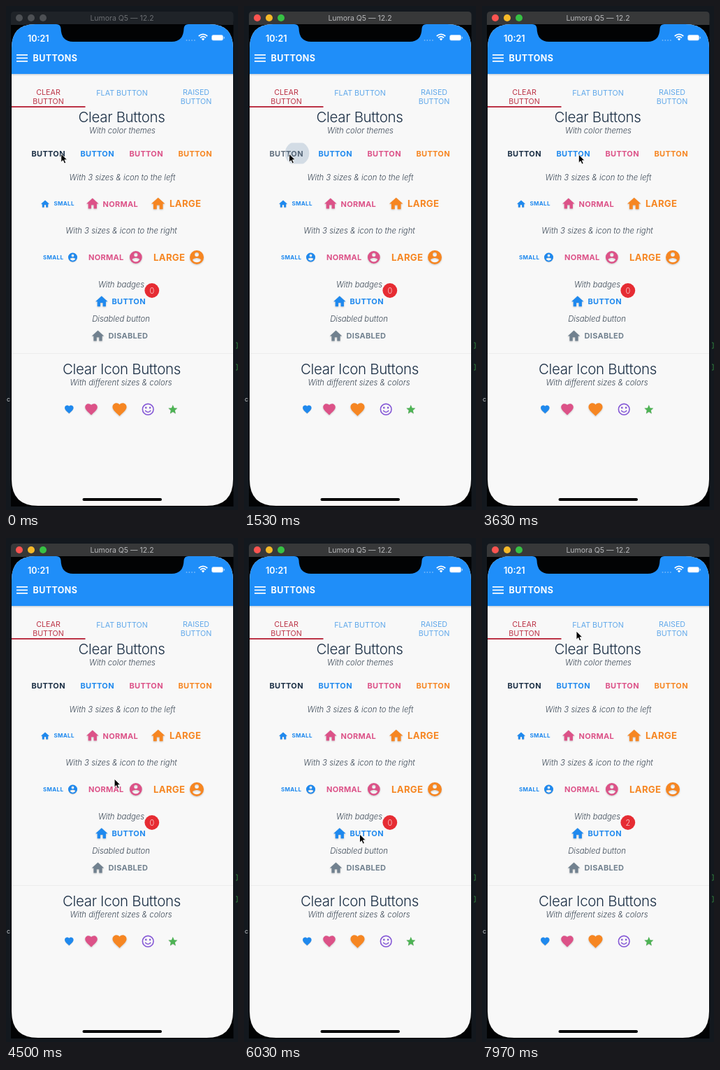
Recreate the animation shown at these times as an HTML page. Size 332 by 720 pixels, loop 8000 ms.

```html
<!DOCTYPE html>
<html lang="en">
<head>
<meta charset="utf-8">
<title>Buttons</title>
<style>
  html, body { margin: 0; width: 100%; height: 100%; overflow: hidden; background: #13181e; }
  svg { display: block; width: 100vw; height: 100vh; }
  text { font-family: Inter, Roboto, sans-serif; white-space: pre; }
  .icon { filter: drop-shadow(0 1px 1px rgba(0, 0, 0, .2)); }
</style>
</head>
<body>
<svg id="stage" viewBox="0 0 332 720"></svg>
<script>
const NS = 'http://www.w3.org/2000/svg';
const stage = document.getElementById('stage');
const LOOP = 8000;

const DARK = '#1b2f45', BLUE = '#1f89ee', PINK = '#dc5288', ORANGE = '#f68622', GREY = '#71818f';
const PAGE = '#f8f8f8', BAR = '#1f8ef9', BLACK = '#020304';

const ICONS = {
  home: 'M10 20v-6h4v6h5v-8h3L12 3 2 12h3v8z',
  user: 'M12 2a10 10 0 1 0 0 20 10 10 0 0 0 0-20zm0 3a3 3 0 1 1 0 6 3 3 0 0 1 0-6zm0 14.2a7.2 7.2 0 0 1-6-3.22c.03-1.99 4-3.08 6-3.08s5.97 1.09 6 3.08a7.2 7.2 0 0 1-6 3.22z',
  heart: 'M12 21.35l-1.45-1.32C5.4 15.36 2 12.28 2 8.5 2 5.42 4.42 3 7.5 3c1.74 0 3.41.81 4.5 2.09C13.09 3.81 14.76 3 16.5 3 19.58 3 22 5.42 22 8.5c0 3.78-3.4 6.86-8.55 11.54z',
  star: 'M12 17.27 18.18 21l-1.64-7.03L22 9.24l-7.19-.61L12 2 9.19 8.63 2 9.24l5.46 4.73L5.82 21z'
};

function el(name, attrs, parent = stage) {
  const node = document.createElementNS(NS, name);
  for (const key in attrs) node.setAttribute(key, attrs[key]);
  parent.appendChild(node);
  return node;
}
const rect = (x, y, width, height, fill, rx = 0, parent) => el('rect', { x, y, width, height, fill, rx }, parent);
const circle = (cx, cy, r, fill, parent) => el('circle', { cx, cy, r, fill }, parent);
const path = (d, attrs, parent) => el('path', { d, ...attrs }, parent);

// y is the middle of the capitals
function label(str, x, y, size, fill, attrs = {}, parent) {
  const node = el('text', { x, y: y + size * 0.364, 'font-size': size, fill, ...attrs }, parent);
  node.textContent = str;
  return node;
}
const MID = { 'text-anchor': 'middle' };
const BOLD = { 'font-weight': 700, 'letter-spacing': 0.3 };
const bold = (str, x, y, size, fill, parent) => label(str, x, y, size, fill, BOLD, parent);
const heading = (str, y) => label(str, 165.5, y, 20.5, DARK, { ...MID, 'font-weight': 300, 'letter-spacing': -0.35 });
const note = (str, y, x = 166.5) =>
  label(str, x, y, 11.3, '#3b4856', { ...MID, 'font-weight': 300, 'font-style': 'italic' });
const tab = (str, x, y, fill) => label(str, x, y, 10.7, fill, MID);

function icon(name, cx, cy, width, fill, parent) {
  const k = width / 20;
  const midY = { home: 11.5, user: 12, heart: 12.2, star: 11.5 }[name];
  return path(ICONS[name], { fill, class: 'icon', transform: `translate(${cx - 12 * k} ${cy - midY * k}) scale(${k})` }, parent);
}

// Desktop and window
rect(0, 0, 332, 720, '#13181e');
label('c', 1, 562, 9, '#c6c9cc');
for (const y of [485, 516]) path(`M329 ${y - 4}h2v8h-2`, { fill: 'none', stroke: '#2f7d3a' });
rect(7, 22, 318.5, 693, BLACK);
const titleBar = path('M7 27V13q0-5 5-5H320.5q5 0 5 5V27z', {});
const lights = [19, 36, 53].map(x => circle(x, 17, 5));
const title = label('Lumora Q5 — 12.2', 166, 17, 10.5, '#fff', MID);

// Phone screen
const screenPath = 'M8 60Q8 26 42 26H291Q325 26 325 60V676Q325 714 287 714H46Q8 714 8 676z';
const clip = el('clipPath', { id: 'screen' });
path(screenPath, {}, clip);
path(screenPath, { fill: PAGE });
const header = el('g', { 'clip-path': 'url(#screen)' });
rect(8, 97, 317, 2.5, '#e6e8ea', 0, header);
rect(8, 97, 317, 1, '#c8d2dc', 0, header);
rect(8, 26, 317, 71, BAR, 0, header);
path('M72 26Q78 26 78.5 32Q79 51 96 51H237Q254 51 254.5 32Q255 26 261 26z', { fill: BLACK });

// Status bar
label('10:21', 31, 46, 12.5, '#fff', { 'font-weight': 600 });
for (let i = 0; i < 4; i++) circle(258.5 + i * 3.8, 49, 0.9, '#74b8fb');
path('M282 49.5l-2.3-2.5q2.3-2 4.6 0z', { fill: '#fff' });
path('M278 45.3q4-3.5 8 0M275.7 43q6.3-5.3 12.6 0', { fill: 'none', stroke: '#fff', 'stroke-width': 1.7 });
el('rect', { x: 294.5, y: 41.5, width: 16, height: 7.6, rx: 2.2, fill: '#fff', stroke: '#b5d8fd', 'stroke-width': 0.8 });
rect(311.6, 43.8, 1.2, 3, '#b5d8fd', 0.6);

// App bar and tabs
for (const y of [69.1, 73.6, 78.1]) rect(15, y, 16, 1.7, '#fff');
label('BUTTONS', 38.5, 74.5, 12.5, '#fff', { 'font-weight': 700, 'letter-spacing': 0.4 });
const TAB_ON = '#bc3346', TAB_OFF = '#60a8ea';
tab('CLEAR', 60.5, 123.5, TAB_ON);
tab('BUTTON', 60.5, 136, TAB_ON);
tab('FLAT BUTTON', 166, 124, TAB_OFF);
tab('RAISED', 272, 123.5, TAB_OFF);
tab('BUTTON', 272, 136, TAB_OFF);
rect(8, 143, 105.5, 2, TAB_ON);

// Text buttons
heading('Clear Buttons', 158.5);
note('With color themes', 178);
const rippleClip = el('clipPath', { id: 'button' });
rect(29, 195.5, 65, 30, '#000', 3, rippleClip);
const ripple = el('circle', { cx: 76, cy: 210.5, fill: '#7595b2', 'clip-path': 'url(#button)' });
const darkButton = bold('BUTTON', 36.5, 211, 11, DARK);
const blueButton = bold('BUTTON', 106.5, 211, 11, BLUE);
bold('BUTTON', 176.5, 211, 11, PINK);
bold('BUTTON', 246.5, 211, 11, ORANGE);

note('With 3 sizes & icon to the left', 244.5);
icon('home', 56, 282.5, 12, BLUE);
bold('SMALL', 68.5, 282.5, 8, BLUE);
icon('home', 123.8, 282, 17.5, PINK);
bold('NORMAL', 138.5, 282.5, 11, PINK);
icon('home', 217.7, 282, 19.5, ORANGE);
bold('LARGE', 234, 282.5, 13.2, ORANGE);

note('With 3 sizes & icon to the right', 321, 165);
bold('SMALL', 53, 359, 8, BLUE);
icon('user', 95.5, 359, 13, BLUE);
bold('NORMAL', 118, 359, 11, PINK);
icon('user', 185.8, 359, 17.8, PINK);
bold('LARGE', 211, 359, 13.2, ORANGE);
icon('user', 273, 359, 20, ORANGE);

note('With badges', 397.5, 165);
const badgeButton = el('g', {});
icon('home', 136.8, 421.8, 17.5, BLUE, badgeButton);
bold('BUTTON', 151.5, 422, 11, BLUE, badgeButton);
circle(208.8, 406.5, 10.4, '#e62c33', badgeButton);
const count = label('0', 208.8, 406.5, 11, '#fbd5d6', { ...MID, 'font-weight': 300 }, badgeButton);
note('Disabled button', 447, 164.5);
icon('home', 131.5, 471, 17.5, GREY);
bold('DISABLED', 146.5, 471.3, 11, GREY);

// Icon buttons
rect(8, 496, 317, 1, '#eceded');
heading('Clear Icon Buttons', 518.5);
note('With different sizes & colors', 538, 164.5);
icon('heart', 90.3, 576.3, 12.5, BLUE);
icon('heart', 122, 576.3, 17.5, PINK);
icon('heart', 162.5, 576.5, 20, ORANGE);
const PURPLE = '#8457d6';
el('circle', { cx: 203.2, cy: 576.2, r: 7.8, fill: 'none', stroke: PURPLE, 'stroke-width': 1.6 });
circle(200.3, 573.9, 1.3, PURPLE);
circle(206.1, 573.9, 1.3, PURPLE);
path('M199.2 577.8q4 5 8 0', { fill: 'none', stroke: PURPLE, 'stroke-width': 1.5 });
icon('star', 238.8, 576, 13, '#4db354');

rect(109.5, 703, 113.5, 4, BLACK, 2);

const cursor = path('M0 0V12.2L2.8 9.6 4.7 14 6.9 13 5 8.8H8.8z',
  { fill: '#000', stroke: '#fff', 'stroke-width': 0.9, 'stroke-linejoin': 'round' });

// Time, x, y
const MOVES = [
  [0, 78.8, 211], [1250, 76, 211], [1530, 64.5, 211], [1700, 64.5, 211],
  [2450, 123, 212], [2900, 125, 212], [3630, 138.3, 212],
  [5270, 169, 453.5], [5900, 165.5, 423], [7000, 165.5, 423], [7970, 135, 133], [LOOP, 135, 133]
];
const clamp = v => Math.max(0, Math.min(1, v));
const smooth = v => v * v * (3 - 2 * v);

function pointer(t) {
  const i = MOVES.findIndex(m => m[0] > t);
  const [t0, x0, y0] = MOVES[i - 1], [t1, x1, y1] = MOVES[i];
  const k = smooth((t - t0) / (t1 - t0));
  return [x0 + (x1 - x0) * k, y0 + (y1 - y0) * k];
}

// Opacity of a control held from a to b
const pressed = (t, a, b) =>
  1 - 0.32 * Math.min(smooth(clamp((t - a) / 120)), 1 - smooth(clamp((t - b) / 250)));

function draw(t) {
  const active = t >= 800;
  titleBar.setAttribute('fill', active ? '#373839' : '#1f2328');
  title.setAttribute('fill', active ? '#b7b8ba' : '#6b6e72');
  ['#fc5450', '#f6b928', '#37c144'].forEach((c, i) => lights[i].setAttribute('fill', active ? c : '#4d5054'));

  darkButton.setAttribute('opacity', pressed(t, 1300, 1600));
  blueButton.setAttribute('opacity', pressed(t, 2700, 2950));
  badgeButton.setAttribute('opacity', pressed(t, 6150, 6350) * pressed(t, 6680, 6900));

  const grow = clamp((t - 1300) / 400);
  ripple.setAttribute('r', 30 * grow);
  ripple.setAttribute('opacity', t < 1300 ? 0 : 0.28 * (1 - clamp((t - 1600) / 250)));

  count.textContent = t < 6350 ? 0 : t < 6900 ? 1 : 2;
  cursor.setAttribute('transform', `translate(${pointer(t)})`);
}

const start = performance.now();
function tick() {
  draw((performance.now() - start) % LOOP);
  requestAnimationFrame(tick);
}
tick();
</script>
</body>
</html>
```
